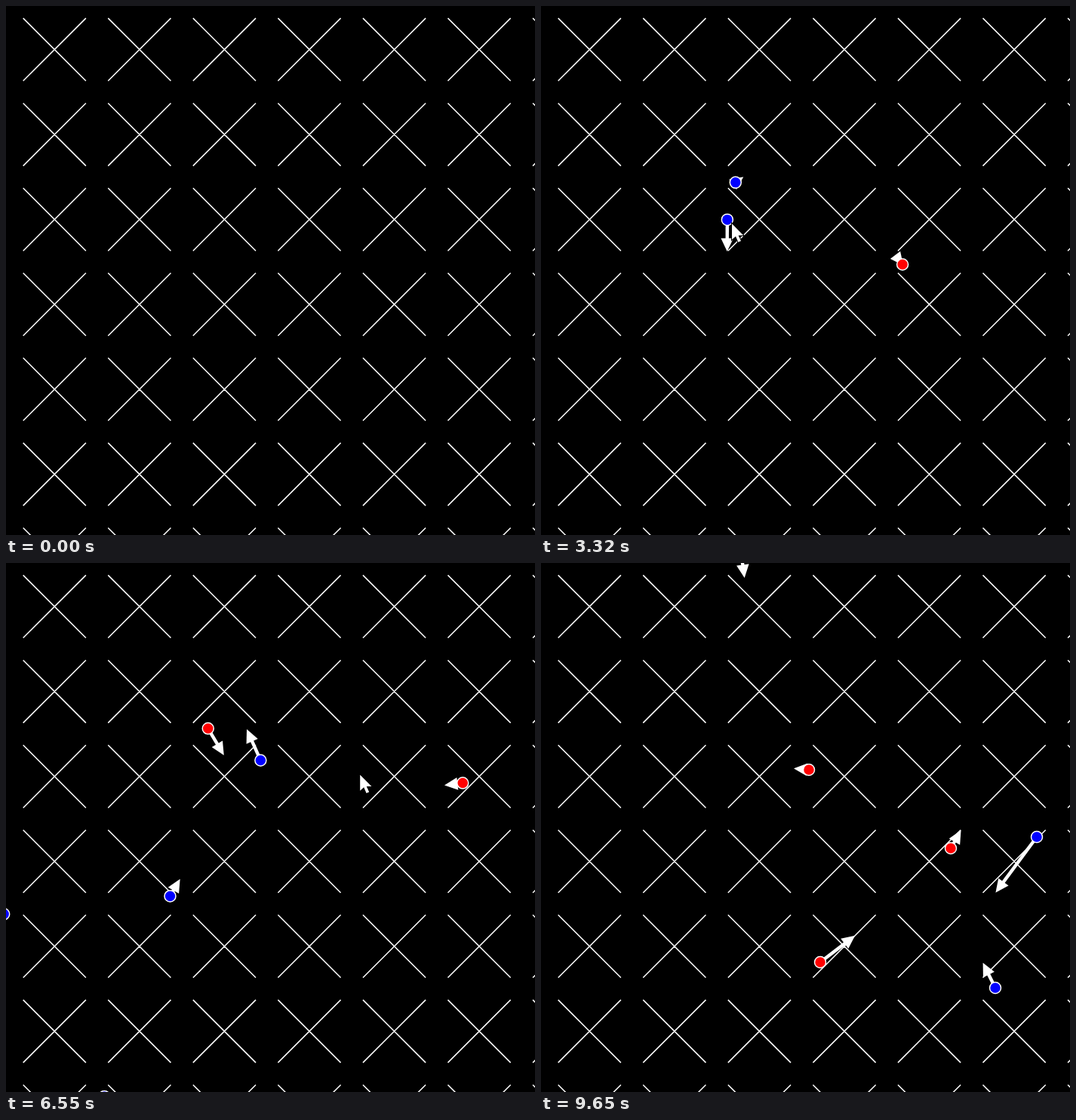
An HTML page that plays this animation: 701x701 px, repeating every 9720 ms.

```html
<!DOCTYPE html>
<html lang="en">
<head>
<meta charset="utf-8">
<title>Charges in a magnetic field</title>
<style>
html, body { margin: 0; width: 100%; height: 100%; overflow: hidden; background: #000; }
svg { display: block; width: 100%; height: 100%; }
</style>
</head>
<body>
<svg id="stage" viewBox="0 0 701 701">
  <rect width="701" height="701" fill="#000"/>
  <path id="field" stroke="#fff" stroke-width="1.5" fill="none"/>
  <g id="charges"></g>
  <path id="cursor" d="M0 0V21L5 16.6L8.4 24.4L12 22.8L8.6 15.4H15.2Z"
    fill="#fff" stroke="#000" stroke-width="2" paint-order="stroke"/>
</svg>
<script>
const SIZE = 701, LOOP = 9720, START = 130, TICK = 68.67, LAST = 139;
const SPIN = 0.0806;     // radians a charge turns per tick
const GAIN = 4.1;        // arrow length per unit of speed
const COULOMB = 37000;
const LINGER = 35;       // ticks a charge lives after its last waypoint

// A waypoint is tick, x, y and, where no arc gives it, the speed.
const waypoint = ([k, x, y, vx, vy]) => ({ k, x, y, vx, vy });
const charge = (q, born, ...points) => ({ q, born, points: points.map(waypoint) });
const red = (...args) => charge(1, ...args);
const blue = (...args) => charge(-1, ...args);

const charges = [
  red(6, [32, 488, 339], [62, 478, 352], [81, 580, 358], [107, 565, 233], [118, 502, 267], [139, 543, 378]),
  blue(10, [32, 238, 256, 1.2, -0.3], [46, 256, 235], [62, 280, 168], [81, 390, 194],
    [107, 219, 258], [118, 137, 157], [139, 263, -30]),
  blue(17, [32, 70, 681, -4.6, 12.2]),
  blue(46, [62, 330, 331], [81, 293, 442], [107, 175, 379], [118, 214, 315], [126, 385, 340], [139, 657, 363]),
  red(53, [62, 451, 348, 5.1, -3.4], [81, 374, 211], [107, 227, 291], [118, 286, 330], [139, 355, 274]),
  blue(70, [81, 36, 694, 7.1, -2.9]),
  blue(90, [107, 12, 452, -0.7, 9.8]),
  blue(80, [107, 76, 619, -0.7, 13.9]),
  blue(97, [107, 562, 272, 9.3, 2.2], [118, 675, 350], [139, 602, 563, -8, 3.7]),
  red(124, [139, 370, 529, 8.8, 11.2])
];

// Circular arc from a to b: its speed and the velocity at either end.
function arc(a, b, q) {
  const dk = b.k - a.k, dx = b.x - a.x, dy = b.y - a.y, half = SPIN * dk / 2;
  const speed = Math.hypot(dx, dy) / dk * half / Math.sin(half);
  const end = side => {
    const angle = Math.atan2(dy, dx) - side * q * half;
    return { speed, vx: speed * Math.cos(angle), vy: speed * Math.sin(angle) };
  };
  return { start: end(-1), finish: end(1) };
}

// The slower of the two arcs that meet at a waypoint sets its velocity.
function setSpeeds({ q, points }) {
  points.forEach((p, i) => {
    if (p.vx !== undefined) return;
    const ends = [];
    if (i > 0) ends.push(arc(points[i - 1], p, q).finish);
    if (i < points.length - 1) ends.push(arc(p, points[i + 1], q).start);
    const { vx, vy } = ends.sort((a, b) => a.speed - b.speed)[0];
    Object.assign(p, { vx, vy });
  });
}

function hermite(a, b, k) {
  const d = b.k - a.k, u = (k - a.k) / d, w = 1 - u;
  const axis = (p, v) => [
    a[p] * w * w * (1 + 2 * u) + b[p] * u * u * (3 - 2 * u) + d * u * w * (a[v] * w - b[v] * u),
    6 * u * w * (b[p] - a[p]) / d + a[v] * w * (1 - 3 * u) + b[v] * u * (3 * u - 2)
  ];
  const [x, vx] = axis("x", "vx"), [y, vy] = axis("y", "vy");
  return { x, y, vx, vy };
}

function between(points, k) {
  const i = points.findIndex(p => p.k > k);
  return hermite(points[i - 1], points[i], k);
}

// Free circular motion through one waypoint.
function orbit(p, q, k) {
  const w = -q * SPIN, turn = w * (k - p.k), c = Math.cos(turn), s = Math.sin(turn);
  const vx = p.vx * c - p.vy * s, vy = p.vx * s + p.vy * c;
  return { x: p.x + (vy - p.vy) / w, y: p.y - (vx - p.vx) / w, vx, vy };
}

function motion({ q, points }, k) {
  const first = points[0], last = points[points.length - 1];
  if (k <= first.k) return orbit(first, q, k);
  if (k >= last.k) return orbit(last, q, k);
  return between(points, k);
}

const alive = (c, k) => k >= c.born && k < c.points[c.points.length - 1].k + LINGER;

// Magnetic force of the charge's speed plus the pull or push of the others.
function force(c, m, k) {
  let x = GAIN * c.q * m.vy, y = -GAIN * c.q * m.vx;
  for (const o of charges) {
    if (o === c || !alive(o, k)) continue;
    const n = motion(o, k), dx = m.x - n.x, dy = m.y - n.y;
    const f = c.q * o.q * COULOMB / Math.max(20, Math.hypot(dx, dy)) ** 3;
    x += f * dx;
    y += f * dy;
  }
  return { x, y };
}

charges.forEach(setSpeeds);

// The pointer drops each charge that starts on the stage.
const inside = p => Math.min(p.x, p.y) > 0 && Math.max(p.x, p.y) < SIZE;
const drops = charges.map(c => ({ ...motion(c, c.born), k: c.born })).filter(inside);
const rests = [
  [0, 642, 690], [32, 256, 323.5], [62, 350, 401], [81, 393, 346],
  [107, 335, 491], [118, 328, 372], [133, 710, 60]
].map(waypoint);
const pointer = [...rests, ...drops].sort((a, b) => a.k - b.k);
pointer.forEach((p, i) => {
  const a = pointer[i - 1] || p, b = pointer[i + 1] || p;
  p.vx = (b.x - a.x) / (b.k - a.k);
  p.vy = (b.y - a.y) / (b.k - a.k);
});

const byId = id => document.getElementById(id);
function set(el, attrs) {
  for (const name in attrs) el.setAttribute(name, attrs[name]);
}
function add(parent, tag, attrs = {}) {
  const el = document.createElementNS("http://www.w3.org/2000/svg", tag);
  set(el, attrs);
  return parent.appendChild(el);
}
const show = (el, on) => { el.style.display = on ? "" : "none"; };

let crosses = "";
for (let row = 0; row < 7; row++) for (let col = 0; col < 7; col++) {
  crosses += `M${22.7 + col * 112.56} ${16.1 + row * 112.56}l83.2 83.2m0 -83.2l-83.2 83.2`;
}
set(byId("field"), { d: crosses });

for (const c of charges) {
  c.g = add(byId("charges"), "g");
  c.shaft = add(c.g, "path", { stroke: "#fff", "stroke-width": 4.4 });
  c.head = add(c.g, "path", { fill: "#fff" });
  c.dot = add(c.g, "circle", { r: 7.5, stroke: "#fff", "stroke-width": 1.5, fill: c.q > 0 ? "#f00" : "#00f" });
}

function drawCharge(c, k) {
  show(c.g, alive(c, k));
  if (!alive(c, k)) return;
  const m = motion(c, k), f = force(c, m, k);
  const len = Math.hypot(f.x, f.y) || 1, ux = f.x / len, uy = f.y / len;
  const at = (along, side) => `${m.x + ux * along - uy * side} ${m.y + uy * along + ux * side}`;
  set(c.shaft, { d: `M${at(0, 0)}L${at(Math.max(0, len - 14), 0)}` });
  set(c.head, { d: `M${at(len, 0)}L${at(len - 17.5, 8.3)}L${at(len - 17.5, -8.3)}Z` });
  set(c.dot, { cx: m.x, cy: m.y });
}

function draw(time) {
  const t = time % LOOP;
  const k = t < START ? -1 : Math.min(LAST, Math.floor((t - START + 52) / TICK));
  charges.forEach(c => drawCharge(c, k));
  const pointing = k >= 0 && k < pointer[pointer.length - 1].k;
  show(byId("cursor"), pointing);
  if (pointing) {
    const { x, y } = between(pointer, k);
    set(byId("cursor"), { transform: `translate(${x} ${y})` });
  }
}

const begin = performance.now();
function frame() {
  draw(performance.now() - begin);
  requestAnimationFrame(frame);
}
frame();
</script>
</body>
</html>
```
